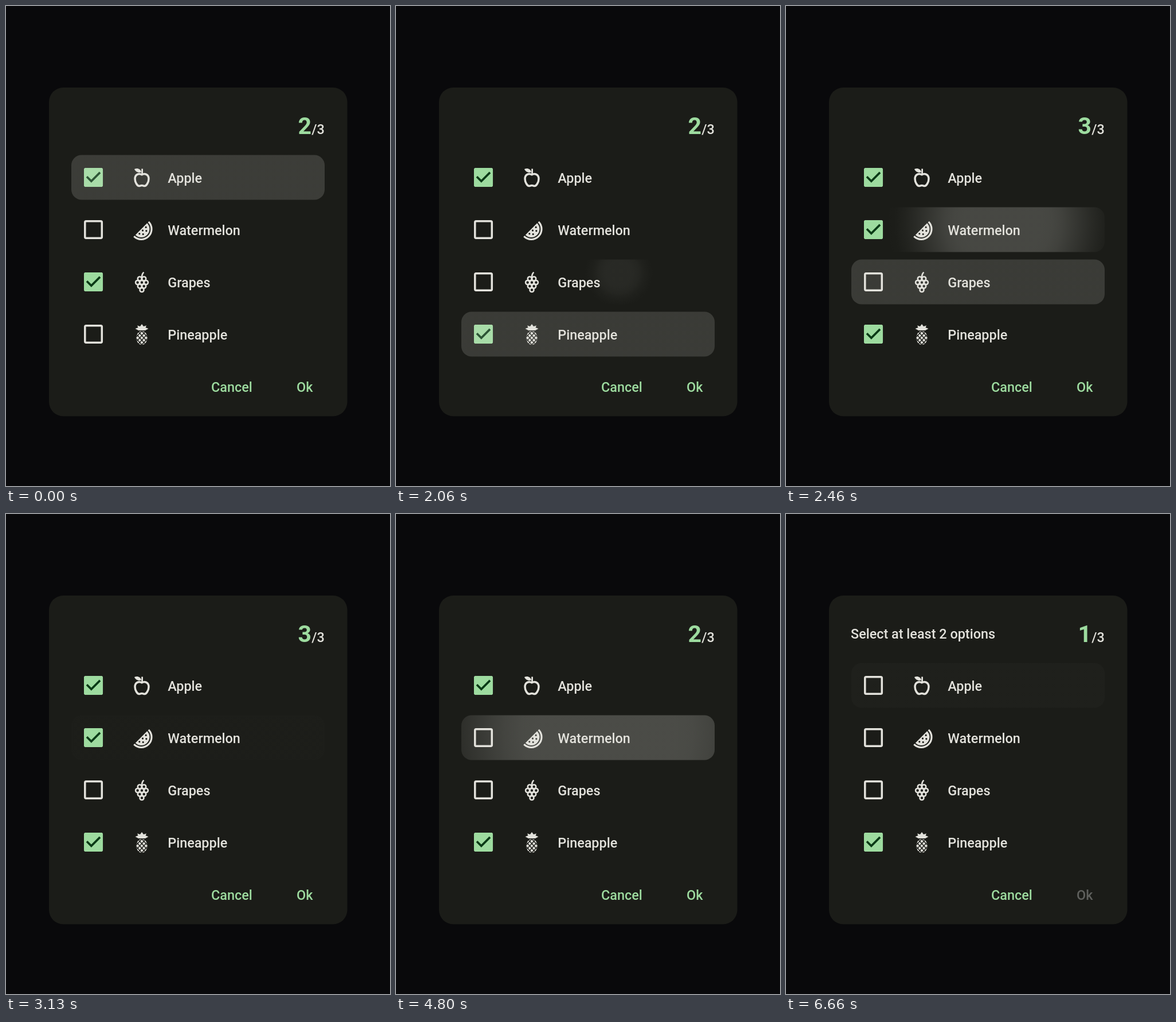
These frames come from a looping animation (670x836 px, 6.72 s). An HTML page with a canvas:

```html
<!DOCTYPE html>
<html lang="en">
<head>
<meta charset="utf-8">
<title>Fruit picker</title>
<style>
  html, body { margin: 0; width: 100%; height: 100%; overflow: hidden; background: #09090b; }
  canvas { display: block; }
</style>
</head>
<body>
<canvas id="stage" width="670" height="836"></canvas>
<script>
const ctx = document.getElementById('stage').getContext('2d');
const LOOP = 6720, STEP = 1000 / 15;
const PANEL = '#1b1c18', LIGHT = '#e3e2dc', GREEN = '#9ddb9f', DARK_GREEN = '#0a3a16';
const ROW = { x: 114, y: 259.5, w: 442, h: 78, pitch: 91, radius: 18 };
const ENTER = 450, EXIT = 350, MAX_RADIUS = 515;

// Rows: checked state at loop start, then the times at which it flips.
const rows = [
  { label: 'Apple', icon: drawApple, on: true, flips: [5860], ripples: [-455, 5900] },
  { label: 'Watermelon', icon: drawWatermelon, on: false, flips: [2260, 4530], ripples: [2347, 4657] },
  { label: 'Grapes', icon: drawGrapes, on: true, flips: [1930], ripples: [1990] },
  { label: 'Pineapple', icon: drawPineapple, on: false, flips: [1530], ripples: [1590] }
];

const clamp = v => Math.min(1, Math.max(0, v));
const span = (a, b, v) => clamp((v - a) / (b - a));
const mix = (a, b, k) => a + (b - a) * k;
const smooth = v => v * v * (3 - 2 * v);

// Cubic bezier (.4, 0, .2, 1)
function fastOutSlowIn(x) {
  let lo = 0, hi = 1;
  for (let i = 0; i < 20; i++) {
    const s = (lo + hi) / 2, q = 1 - s;
    if (1.2 * s * q * q + 0.6 * s * s * q + s * s * s < x) lo = s; else hi = s;
  }
  return smooth(lo);
}

function fillRound(x, y, w, h, r, style) {
  ctx.beginPath();
  ctx.roundRect(x, y, w, h, r);
  ctx.fillStyle = style;
  ctx.fill();
}

function text(str, x, y, color, font = '500 23.4px', align = 'left') {
  ctx.font = font + ' Roboto, sans-serif';
  ctx.textAlign = align;
  ctx.fillStyle = color;
  ctx.fillText(str, x, y);
}

function disc(x, y, r) {
  ctx.beginPath();
  ctx.arc(x, y, r, 0, 7);
}

function strokePath(d, width, color = LIGHT) {
  ctx.strokeStyle = color;
  ctx.lineWidth = width;
  ctx.stroke(new Path2D(d));
}

// Icons are drawn around the centre of their row.
function drawApple() {
  strokePath('M0-5.2C-5-8-12-6-12 2C-12 8-8 14.5-4.5 14.5C-2.5 14.5-1.5 13.4 0 13.4' +
    'C1.5 13.4 2.5 14.5 4.5 14.5C8 14.5 12 8 12 2C12-6 5-8 0-5.2Z', 3.5);
  strokePath('M.6-15.5V-6', 2.8);
  ctx.fill(new Path2D('M-13-15C-8-17.5-2-15.5-.8-9.5C-6-8-11-10-13-15Z'));
}

function drawWatermelon() {
  ctx.translate(-1, -1.5);
  ctx.rotate(-Math.PI / 4);
  ctx.beginPath();
  ctx.arc(0, 0, 18, 0, Math.PI);
  ctx.lineWidth = 3.2;
  ctx.stroke();
  ctx.beginPath();
  ctx.arc(0, 0, 14.4, 0, Math.PI);
  ctx.fill();
  ctx.fillStyle = PANEL;
  for (const [x, y] of [[-8, 3.5], [0, 3.5], [8, 3.5], [-4, 8.5], [4, 8.5]]) {
    disc(x, y, 1.6);
    ctx.fill();
  }
}

function drawGrapes() {
  ctx.lineWidth = 2.6;
  [2, 3, 2, 1].forEach((n, line) => {
    for (let i = 0; i < n; i++) {
      disc((i - (n - 1) / 2) * 7.4, -6 + line * 6.5, 3.5);
      ctx.stroke();
    }
  });
  strokePath('M0-8C0-12 .5-15 3.5-17.2', 2.6);
}

function drawPineapple() {
  ctx.fill(new Path2D('M0-18L3-14L8-15.5L6.5-12L11.5-10L6-7L-6-7L-11.5-10L-6.5-12L-8-15.5L-3-14Z'));
  ctx.beginPath();
  ctx.ellipse(0, 6, 9.7, 12, 0, 0, 7);
  ctx.fill();
  ctx.clip();
  for (let y = -14; y <= 26; y += 8) {
    strokePath(`M-10 ${y - 11}L10 ${y + 11}M10 ${y - 11}L-10 ${y + 11}`, 1.5, PANEL);
  }
}

function drawCheckbox(y, amount) {
  ctx.strokeStyle = LIGHT;
  ctx.lineWidth = 3.5;
  ctx.beginPath();
  ctx.roundRect(137.8, y - 14.8, 29.5, 29.5, 2);
  ctx.stroke();
  if (!amount) return;
  ctx.save();
  ctx.globalAlpha = amount;
  fillRound(136, y - 16.5, 33, 33, 3, GREEN);
  ctx.translate(152.5, y);
  ctx.scale(33 / 18, 33 / 18);
  ctx.fillStyle = DARK_GREEN;
  ctx.fill(new Path2D('M-2 5L-7 0L-5.59-1.41L-2 2.17L5.59-5.42L7-4Z'));
  ctx.restore();
}

// Soft-edged circle that grows from the touch point, then fades away.
function drawRipple(age, top) {
  if (age <= 0 || age >= ENTER + EXIT) return;
  const p = age < ENTER ? 0.5 * fastOutSlowIn(age / ENTER) : 0.5 + 0.5 * (age - ENTER) / EXIT;
  const fadeIn = span(0, 0.13, p);
  const alpha = 0.2 * Math.min(fadeIn, 1 - span(0.4, 1, p)) +
    0.04 * Math.min(fadeIn, 1 - span(0.4, 0.5, p));
  const radius = Math.max(0.1, MAX_RADIUS * span(0, 0.45, p));
  const drift = clamp(p * 2);
  const cx = mix(393, ROW.x + ROW.w / 2, drift);
  const cy = top + ROW.h / 2 - mix(17, 0, drift);
  const glow = ctx.createRadialGradient(cx, cy, radius / 2, cx, cy, radius * 1.5);
  for (let k = 0; k <= 1; k += 0.125) {
    glow.addColorStop(k, `rgba(227,227,220,${alpha * (1 - smooth(k))})`);
  }
  fillRound(ROW.x, top, ROW.w, ROW.h, ROW.radius, glow);
}

function drawRow(row, index, t) {
  const top = ROW.y + index * ROW.pitch, mid = top + ROW.h / 2;
  let amount = row.on ? 1 : 0;
  for (const flip of row.flips) amount = mix(amount, 1 - Math.round(amount), span(flip + 20, flip + 130, t));
  drawCheckbox(mid, amount);
  ctx.save();
  ctx.translate(237, mid + 0.5);
  ctx.fillStyle = ctx.strokeStyle = LIGHT;
  row.icon();
  ctx.restore();
  text(row.label, 282.2, mid + 9, LIGHT);
  for (const start of row.ripples) drawRipple(t - start, top);
}

function draw(t) {
  ctx.fillStyle = '#09090b';
  ctx.fillRect(0, 0, 670, 836);
  fillRound(75, 142, 520.5, 572.5, 25, PANEL);

  const count = rows.reduce((sum, row) => {
    const flipped = row.flips.filter(f => t >= f).length % 2 === 1;
    return sum + (row.on !== flipped ? 1 : 0);
  }, 0);
  text(count, 533, 222.5, GREEN, '700 41px', 'right');
  text('/3', 555.8, 222.5, LIGHT, '500 23.4px', 'right');

  if (count < 2) {
    ctx.globalAlpha = span(5800, 5990, t);
    text('Select at least 2 options', 113, 216.5, LIGHT);
    ctx.globalAlpha = 1;
  }
  rows.forEach((row, i) => drawRow(row, i, t));
  text('Cancel', 358, 672, GREEN);
  text('Ok', 507, 672, count < 2 ? '#5f605d' : GREEN);
}

function tick() {
  const t = performance.now() % LOOP;
  const beat = Math.floor((t + 9.99) / STEP);
  draw(Math.floor(beat * STEP / 10 + 1e-6) * 10);
  requestAnimationFrame(tick);
}
tick();
</script>
</body>
</html>
```
